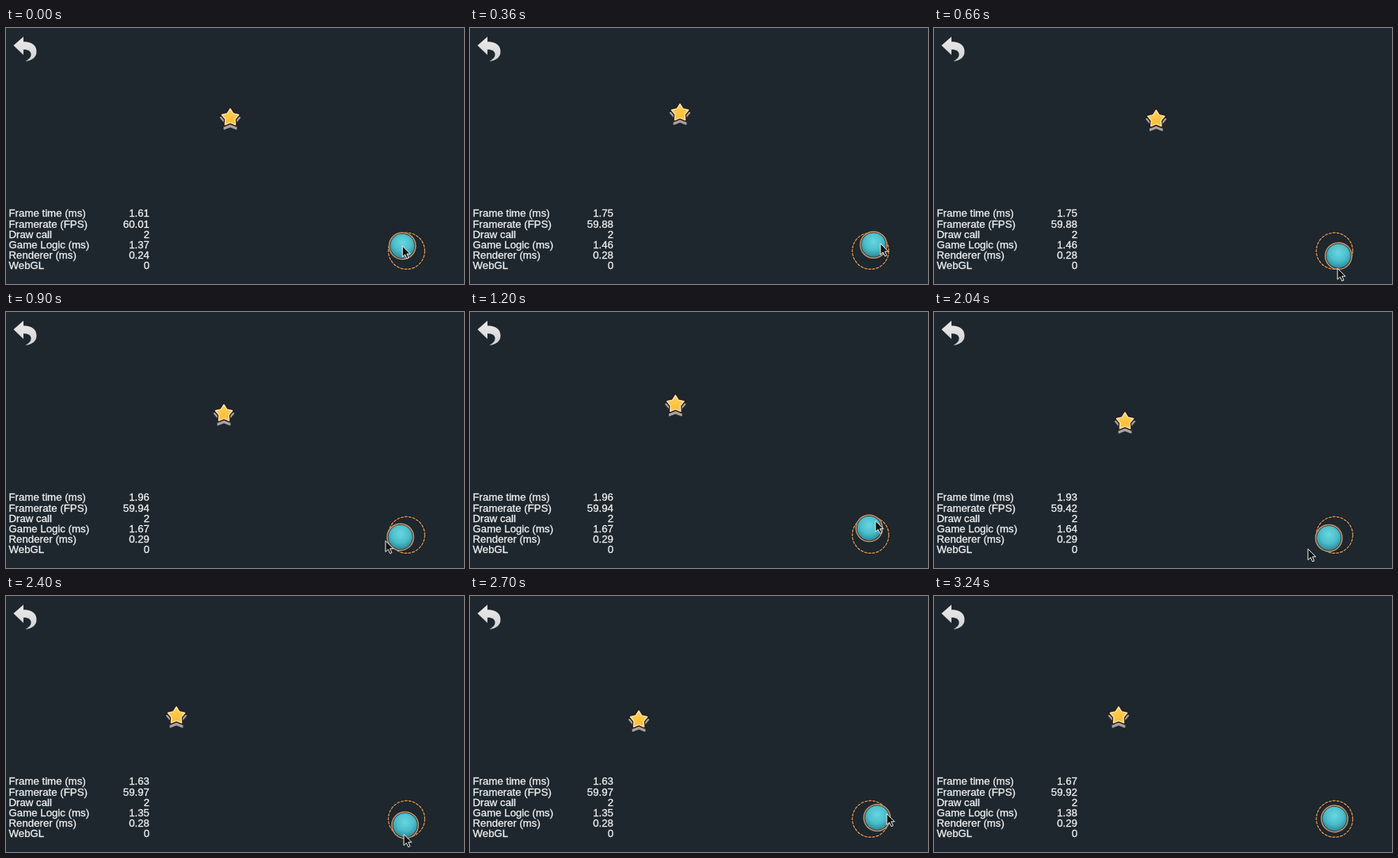
Write an HTML page that moves like this. It is 578 by 323 pixels and loops after 3300 ms.

```html
<!DOCTYPE html>
<html lang="en">
<head>
<meta charset="utf-8">
<title>Joystick demo</title>
<style>
  html, body { margin: 0; width: 100%; height: 100%; overflow: hidden; background: #1e272e; }
  svg { display: block; width: 100vw; height: 100vh; }
  text {
    font: 13.25px "Liberation Sans", Arial, sans-serif;
    fill: #f2f2f2; stroke: #f2f2f2; stroke-width: .3px;
  }
</style>
</head>
<body>
<svg viewBox="0 0 578 323">
  <defs>
    <radialGradient id="teal" cx=".5" cy=".36" r=".66">
      <stop offset="0" stop-color="#68d6e0"/>
      <stop offset=".55" stop-color="#4bbecb"/>
      <stop offset="1" stop-color="#2b8796"/>
    </radialGradient>
    <linearGradient id="silver" x2="0" y2="1">
      <stop offset="0" stop-color="#ececec"/>
      <stop offset="1" stop-color="#d2d2d2"/>
    </linearGradient>
    <linearGradient id="gold" x2="0" y2="1">
      <stop offset="0" stop-color="#ffd050"/>
      <stop offset="1" stop-color="#fdbb34"/>
    </linearGradient>
  </defs>
  <path fill="url(#silver)" d="M9.500 22L22 11V17.300C33 17.500 38.500 22 38.500 30C38.500 37 33 41 24.500 42C30 39 32 36 31.500 32.500C31 29 28 27.300 22 27.300V34Z"/>
  <g id="stats"></g>
  <g id="star" stroke-linejoin="round"></g>
  <g fill="none" transform="translate(505.5 281.3)">
    <circle r="23" stroke="#15171a" stroke-width="2.8"/>
    <circle r="23" stroke="#cf9358" stroke-width="1.4" stroke-dasharray="4 1"/>
  </g>
  <g id="knob">
    <circle r="17.2" fill="#2b2524"/>
    <circle r="16.7" fill="none" stroke="#c49770" stroke-width="1.5"/>
    <circle r="15.2" fill="url(#teal)"/>
  </g>
  <path id="cursor" d="M0 0V14L3.300 10.900L5.700 16L8 15L5.700 10H10Z" fill="#111" stroke="#eee"/>
</svg>
<script>
const LOOP = 3300, STEP = 60, RELEASE = 3000;
const BASE = { x: 505.5, y: 281 }, REACH = 8.3, LAG = 50, SPEED = 0.08;
const $ = id => document.getElementById(id);

// Key poses: the pointer's heading in degrees and distance from the base, and where the star is.
const poses = [
  [0, -131, 8, 283, 113], [180, -180, 18, 271, 109], [360, -36, 15.4, 265, 107],
  [900, 164, 27.6, 275, 128], [1500, 415, 9.7, 262, 111], [2040, 512, 38, 241, 138],
  [2400, 460, 20, 215, 151], [2700, 343, 21.4, 213, 156], [3000, 400, 12, 233, 151]
].map(([t, degrees, reach, x, y]) => ({ t, angle: degrees * Math.PI / 180, reach, x, y }));

function segment(time) {
  const t = Math.min(Math.max(time, 0), RELEASE);
  const next = Math.max(1, poses.findIndex(pose => pose.t >= t));
  const a = poses[next - 1], b = poses[next], span = b.t - a.t;
  const u = (t - a.t) / span, ease = u * u * (3 - 2 * u);
  return { a, b, span, u, mix: key => a[key] + (b[key] - a[key]) * ease };
}

const polar = (angle, r) => ({ x: BASE.x + r * Math.cos(angle), y: BASE.y + r * Math.sin(angle) });

function cursorAt(t) {
  const { mix } = segment(t);
  return polar(mix('angle'), mix('reach'));
}

// The knob trails the pointer and stays inside its ring.
function knobAt(t) {
  if (t >= RELEASE) return BASE;
  const { mix } = segment(t - LAG);
  return polar(mix('angle'), Math.min(mix('reach'), REACH));
}

// The star curves from pose to pose, leaving and arriving along the heading.
function starAt(t) {
  const { a, b, span, u, mix } = segment(t);
  const leave = SPEED * span * u * (1 - u) ** 2, arrive = SPEED * span * u * u * (1 - u);
  const along = (key, wave) => mix(key) + leave * wave(a.angle) - arrive * wave(b.angle);
  return { x: along('x', Math.cos), y: along('y', Math.sin) };
}

function add(parent, tag, attrs, text = '') {
  const node = document.createElementNS('http://www.w3.org/2000/svg', tag);
  for (const key in attrs) node.setAttribute(key, attrs[key]);
  node.textContent = text;
  parent.append(node);
  return node;
}

function addStar(radius, cy, fill, stroke, width) {
  const points = Array.from({ length: 10 }, (_, i) => {
    const r = i % 2 ? radius * 0.57 : radius, a = i * Math.PI / 5;
    return `${r * Math.sin(a)},${cy - r * Math.cos(a)}`;
  }).join(' ');
  add($('star'), 'polygon', { points, fill, stroke, 'stroke-width': width });
}
addStar(13, 4, '#aaa39d', '#aaa39d', 1.6);
addStar(12.5, 0.3, '#2b1815', '#2b1815', 2.5);
addStar(11.2, 0, 'url(#gold)', '#ffe6b5', 1.4);

// Framerate, game logic and renderer readings, renewed twice a second.
const readings = [
  [60.01, 1.37, 0.24], [59.88, 1.464, 0.284], [59.94, 1.67, 0.29], [59.9, 1.59, 0.32],
  [59.42, 1.64, 0.29], [59.97, 1.35, 0.28], [59.92, 1.38, 0.29]
];
const labels = ['Frame time (ms)', 'Framerate (FPS)', 'Draw call', 'Game Logic (ms)', 'Renderer (ms)', 'WebGL'];
const values = labels.map((label, i) => {
  const y = 238.4 + i * 13.2;
  add($('stats'), 'text', { x: 3.5, y }, label);
  return add($('stats'), 'text', { x: 181, y, 'text-anchor': 'end' });
});

function showStats(t) {
  const [fps, logic, draw] = readings[Math.floor((t + 170) / 500)];
  const ms = value => value.toFixed(2);
  [ms(logic + draw), fps, 2, ms(logic), ms(draw), 0]
    .forEach((value, i) => { values[i].textContent = value; });
}

function place(id, { x, y }) {
  $(id).setAttribute('transform', `translate(${x.toFixed(2)} ${y.toFixed(2)})`);
}

function render(time) {
  const t = Math.floor(time % LOOP / STEP) * STEP;
  place('star', starAt(t));
  place('knob', knobAt(t));
  place('cursor', cursorAt(t));
  $('cursor').style.display = t < RELEASE ? '' : 'none';
  showStats(t);
}

const start = performance.now();
function tick() {
  render(performance.now() - start);
  requestAnimationFrame(tick);
}
tick();
</script>
</body>
</html>
```
